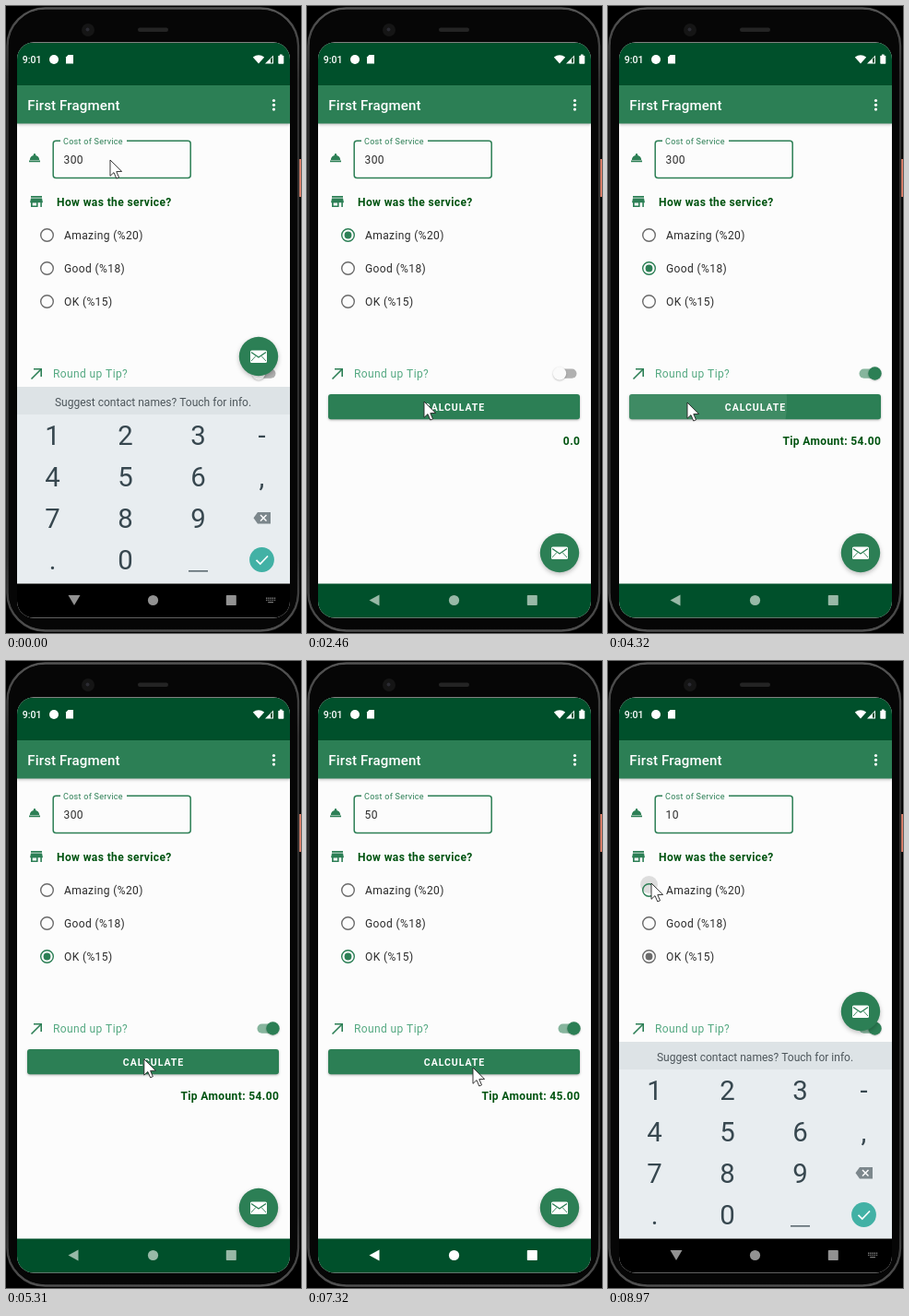
Recreate the animation shown at these times as an HTML page with a canvas. Size 320 by 680 pixels, loop 9 s.

```html
<!DOCTYPE html>
<html lang="en">
<head>
<meta charset="utf-8">
<title>Tip calculator</title>
<style>
html, body { margin: 0; width: 100%; height: 100%; overflow: hidden; background: #000; }
canvas { display: block; width: 320px; height: 680px; }
</style>
</head>
<body>
<canvas id="stage"></canvas>
<script>
const W = 320, H = 680, LOOP = 9000;
const canvas = document.getElementById('stage');
const g = canvas.getContext('2d');
const ratio = window.devicePixelRatio || 1;
canvas.width = W * ratio;
canvas.height = H * ratio;

const DARK = '#00502b', GREEN = '#2c7f55', BOLD = '#005310', INK = '#2b2b2b', GREY = '#6b6b6b';
const PAPER = '#fcfcfc', KEY = '#37474f', SP = 0.753;
const options = [['Amazing', 20], ['Good', 18], ['OK', 15]];

// The whole session: when and where each control is tapped
const tap = (time, kind, x, y, option) => ({ time, kind, x, y, option });
const taps = [
  tap(-500, 'field', 113, 167),
  tap(430, 'back', 74, 642),
  tap(780, 'radio', 46, 282, 1),
  tap(1240, 'radio', 50, 251, 0),
  tap(2520, 'button', 127, 429),
  tap(3080, 'switch', 284, 397),
  tap(3680, 'radio', 46, 283, 1),
  tap(4240, 'button', 86, 430),
  tap(4880, 'radio', 46, 318, 2),
  tap(5400, 'button', 150, 432),
  tap(5740, 'field', 112, 166),
  tap(6850, 'back', 74, 642),
  tap(7400, 'button', 180, 441),
  tap(7850, 'field', 112, 166),
  tap(8940, 'radio', 47, 241, 0)
];
const entries = [{ time: 6000, value: '50' }, { time: 8150, value: '10' }];
const KEY_MS = 75, TYPING_MS = 540, TRAVEL = 400, REST = 80;

const clamp = v => Math.max(0, Math.min(1, v));
const ease = v => v * v * (3 - 2 * v);
const mix = (a, b, k) => a + (b - a) * k;
const within = (t, a, b) => t >= a && t < b;

// Each entry deletes the old number key by key, then types the new one
function costAt(t) {
  let cost = '300';
  for (const { time, value } of entries) {
    const strokes = Math.floor((t - time) / KEY_MS);
    if (strokes < 0) break;
    const left = cost.length - strokes;
    cost = left > 0 ? cost.slice(0, left) : value.slice(0, -left);
  }
  return cost;
}

function stateAt(t) {
  const s = { pick: -1, last: -1, pickAge: 0, tip: '0.0', round: 0, keys: 0, bright: false };
  for (const { time, kind, option } of taps) {
    const age = t - time;
    if (age < 0) break;
    if (kind === 'radio') Object.assign(s, { last: s.pick, pick: option, pickAge: age });
    if (kind === 'switch') s.round = ease(clamp(age / 200));
    if (kind === 'field' || kind === 'back') {
      s.keys = mix(s.keys, kind === 'field' ? 1 : 0, ease(clamp((age - 20) / 160)));
      s.bright = kind === 'back' && age < 1350;
    }
    if (kind === 'button' && age >= 40) {
      const tip = costAt(time) * options[s.pick][1] / 100;
      s.tip = 'Tip Amount: ' + (s.round ? Math.ceil(tip) : tip).toFixed(2);
    }
  }
  return s;
}

// Arrives shortly before each tap and rests until the next trip
function mouseAt(t) {
  let [{ x, y, time: left }] = taps;
  for (const p of taps.slice(1)) {
    const arrive = p.time - REST;
    const start = Math.max(left + 60, arrive - TRAVEL, 0);
    const k = ease(clamp((t - start) / (arrive - start)));
    x = mix(x, p.x, k);
    y = mix(y, p.y, k);
    left = p.time;
  }
  return [x, y];
}

const typingAt = t => entries.some(e => within(t, e.time - 50, e.time + TYPING_MS));

function eachRipple(t, kind, life, paint) {
  for (const p of taps) {
    const age = t - p.time;
    if (p.kind === kind && within(age, 0, life)) paint(p, age, clamp((life - age) / 200));
  }
}

function text(s, x, y, sp, color, { weight = 400, align = 'left', spacing = 0.03125 } = {}) {
  const size = sp * SP;
  g.font = `${weight} ${size}px Roboto, "Noto Sans", sans-serif`;
  g.letterSpacing = spacing * size + 'px';
  g.textAlign = align;
  g.fillStyle = color;
  g.fillText(s, x, y);
}

function box(x, y, w, h, color, r = 0) {
  g.fillStyle = color;
  g.beginPath();
  g.roundRect(x, y, w, h, r);
  g.fill();
}

function frame(x, y, w, h, r, color, width) {
  g.strokeStyle = color;
  g.lineWidth = width;
  g.beginPath();
  g.roundRect(x, y, w, h, r);
  g.stroke();
}

function disc(x, y, r, color) {
  box(x - r, y - r, 2 * r, 2 * r, color, r);
}

function path(points) {
  g.beginPath();
  for (let i = 0; i < points.length; i += 2) g.lineTo(points[i], points[i + 1]);
}

function poly(points, color) {
  path(points);
  g.fillStyle = color;
  g.fill();
}

function line(points, color, width) {
  path(points);
  g.strokeStyle = color;
  g.lineWidth = width;
  g.stroke();
}

function shadowed(blur, dy, alpha, draw) {
  g.save();
  g.shadowColor = `rgba(0,0,0,${alpha})`;
  g.shadowBlur = blur * ratio;
  g.shadowOffsetY = dy * ratio;
  draw();
  g.restore();
}

function clipped(x, y, w, h, r, draw) {
  g.save();
  g.beginPath();
  g.roundRect(x, y, w, h, r);
  g.clip();
  draw();
  g.restore();
}

function drawPhone() {
  box(0, 0, W, H, '#000');
  box(318, 166, 2, 41, '#e8836b');
  const rim = g.createLinearGradient(0, 0, 0, H);
  rim.addColorStop(0, '#555');
  rim.addColorStop(0.12, '#303030');
  rim.addColorStop(0.88, '#303030');
  rim.addColorStop(1, '#505050');
  frame(1.5, 2.5, 315.5, 675, 41, rim, 2.5);
  box(3, 4, 312.5, 672, '#060606', 39);
  disc(89, 26, 7, '#151515');
  disc(88.5, 25.5, 2, '#2b2b32');
  box(143, 23.5, 33, 4.5, '#242424', 2.2);
}

function drawBars() {
  box(12, 40, 296, 47, DARK);
  text('9:01', 17.7, 62, 14, '#fff', { weight: 500, spacing: 0 });
  disc(52, 58, 5, '#fff');
  poly([67.5, 53, 73, 53, 73, 62.5, 65, 62.5, 65, 55.5], '#fff');
  g.beginPath();
  g.moveTo(274, 62.5);
  g.lineTo(267.8, 55.5);
  g.quadraticCurveTo(274, 51, 280.2, 55.5);
  g.fill();
  poly([290, 53.5, 290, 62.5, 281, 62.5], '#fff');
  poly([287, 57.5, 289, 55.5, 289, 61.5, 287, 61.5], DARK);
  box(295.3, 53.8, 6, 9, '#fff', 0.8);
  box(297, 52.6, 2.6, 2, '#fff');

  shadowed(3, 1, 0.22, () => box(12, 86, 296, 41.5, GREEN));
  text('First Fragment', 23.3, 113, 20, '#fff', { weight: 500, spacing: 0.0094 });
  for (let i = -1; i <= 1; i++) disc(290.5, 107.3 + 4.8 * i, 1.6, '#fff');
}

function drawField(t) {
  // Service bell
  g.fillStyle = GREEN;
  g.beginPath();
  g.arc(31, 167, 5.2, Math.PI, 0);
  g.fill();
  box(25, 167.6, 12, 1.7, GREEN);
  disc(31, 161.2, 1.2, GREEN);

  frame(51.2, 146.2, 149, 40.4, 3, GREEN, 1.5);
  box(59, 144, 72, 5, PAPER);
  text('Cost of Service', 62, 149.5, 12, GREEN);
  const cost = costAt(t);
  text(cost, 62.5, 171, 16, INK);
  if (typingAt(t) || within(t % 1000, 500, 950)) {
    box(62.5 + g.measureText(cost).width, 159, 1.3, 15, INK);
  }
}

function drawStore() {
  box(27, 206, 12, 1.7, GREEN);
  poly([27, 208.6, 39, 208.6, 40, 213.3, 26, 213.3], GREEN);
  box(27, 213, 7.6, 5, GREEN);
  box(37.3, 213, 1.6, 5, GREEN);
  box(28.7, 213.4, 4.3, 3, PAPER);
}

function drawRadios(t, s) {
  const x = 44.5, rowY = i => 248.5 + 36 * i;
  eachRipple(t, 'radio', 320, (p, age, fade) => {
    const k = clamp(age / 150);
    disc(x, mix(p.y, rowY(p.option), k), 8 + 7 * k, `rgba(0,0,0,${0.12 * fade})`);
  });
  options.forEach(([name, rate], i) => {
    const y = rowY(i), on = s.pick === i;
    const leaving = s.last === i && !on && s.pickAge < 120;
    const color = on ? GREEN : GREY;
    frame(x - 6.8, y - 6.8, 13.6, 13.6, 6.8, color, 1.4);
    const grow = on ? clamp((s.pickAge - 40) / 120) : +leaving;
    if (grow) disc(x, y, 3.9 * grow, color);
    text(`${name} (%${rate})`, 63, y + 4.3, 16, INK);
  });
}

function drawSwitch(t, k) {
  line([27.5, 404.5, 38, 394], GREEN, 1.6);
  line([30, 393.8, 38.2, 393.8, 38.2, 402], GREEN, 1.6);
  text('Round up Tip?', 51, 403, 16, '#55a982');
  const x = 274 + 15.5 * k, on = k > 0.5;
  eachRipple(t, 'switch', 400, (p, age, fade) => disc(x, 398.5, 14, `rgba(44,127,85,${0.16 * fade})`));
  box(272.5, 393.6, 20, 10.2, on ? '#86b59d' : '#b1b1b1', 5.1);
  shadowed(2, 0.7, 0.25, () => disc(x, 398.5, 7.2, on ? GREEN : '#fafafa'));
}

function drawButton(t, tip) {
  shadowed(2.5, 1, 0.3, () => box(23, 421, 273, 27.2, GREEN, 3));
  clipped(23, 421, 273, 27.2, 3, () => {
    eachRipple(t, 'button', 450, (p, age, fade) =>
      disc(p.x, p.y, 19 + age * 1.1, `rgba(255,255,255,${0.09 * fade})`));
  });
  text('CALCULATE', 160, 439, 14, '#fff', { weight: 700, align: 'center', spacing: 0.0893 });
  text(tip, 296.3, 475.5, 16, BOLD, { weight: 700, align: 'right' });
}

function drawMail(y) {
  shadowed(5, 2, 0.25, () => disc(274, y, 21.2, GREEN));
  box(265, y - 6.5, 18, 13.5, '#fff', 1.6);
  line([266, y - 4.5, 274, y + 1, 282, y - 4.5], GREEN, 1.4);
  line([266, y + 5, 271, y - 0.5], GREEN, 0.9);
  line([282, y + 5, 277, y - 0.5], GREEN, 0.9);
}

function drawKeyboard(k) {
  clipped(12, 413, 296, 213.5, 0, () => {
    g.translate(0, 213.5 * (1 - k));
    box(12, 413, 296, 214, '#e8edf0');
    box(12, 413, 296, 30, '#dde3e6');
    text('Suggest contact names? Touch for info.', 159.5, 433.5, 16, '#4d565b', { align: 'center', spacing: 0 });
    ['123-', '456,', '789', '.0'].forEach((row, j) => [...row].forEach((c, i) =>
      text(c, 50.5 + 79 * i - (i > 2 ? 10 : 0), 476.2 + 45 * j, 39, KEY, { align: 'center', spacing: 0 })));
    box(198, 612.3, 21, 1.2, KEY);
    poly([273, 549, 287, 549, 287, 561.5, 273, 561.5, 268.5, 555.2], '#7c878c');
    line([276, 552, 282.5, 558.5], '#fff', 1.4);
    line([282.5, 552, 276, 558.5], '#fff', 1.4);
    disc(277.5, 600.5, 13.4, '#42b1a5');
    line([271.5, 600.8, 275.8, 605, 284, 596.5], '#fff', 1.7);
  });
}

function drawNav(t, open, bright) {
  box(12, 626.5, 296, 37, open ? '#000' : DARK);
  eachRipple(t, 'back', 400, (p, age, fade) => box(44, 629, 60, 32, `rgba(255,255,255,${0.18 * fade})`, 16));
  const color = open ? '#929292' : bright ? '#fff' : '#98b9a7';
  if (open) {
    poly([67.5, 639, 80.5, 639, 74, 650], color);
    for (let i = 0; i < 10; i++) box(282 + 2.2 * (i % 5), 641.5 + 2.2 * Math.floor(i / 5), 1.4, 1.4, '#777');
    box(284.2, 646, 5.8, 1.3, '#777');
  } else {
    poly([78.5, 638.5, 78.5, 650.5, 67.5, 644.5], color);
  }
  disc(159.5, 644.5, 5.6, color);
  box(238.8, 639, 11, 11, color, 0.8);
}

function drawMouse(t) {
  if (typingAt(t)) return;
  g.save();
  g.translate(...mouseAt(t));
  path([0, 0, 0, 17.3, 4, 13.6, 6.8, 20, 9.5, 18.8, 6.8, 12.6, 12.6, 12.4]);
  g.closePath();
  g.fillStyle = '#fff';
  g.fill();
  g.strokeStyle = '#222';
  g.lineWidth = 0.9;
  g.stroke();
  g.restore();
}

function draw(t) {
  g.setTransform(ratio, 0, 0, ratio, 0, 0);
  const s = stateAt(t), open = s.keys > 0.02;
  drawPhone();
  clipped(12, 39.5, 296, 624, 18, () => {
    box(12, 39, 296, 626, PAPER);
    drawBars();
    drawField(t);
    drawStore();
    text('How was the service?', 55, 216.8, 16, BOLD, { weight: 700 });
    drawRadios(t, s);
    drawSwitch(t, s.round);
    drawButton(t, s.tip);
    drawMail(open ? 380 : 593);
    if (open) drawKeyboard(s.keys);
    drawNav(t, open, s.bright);
  });
  drawMouse(t);
}

const begin = performance.now();
function tick() {
  draw((performance.now() - begin) % LOOP);
  requestAnimationFrame(tick);
}
tick();
</script>
</body>
</html>
```
